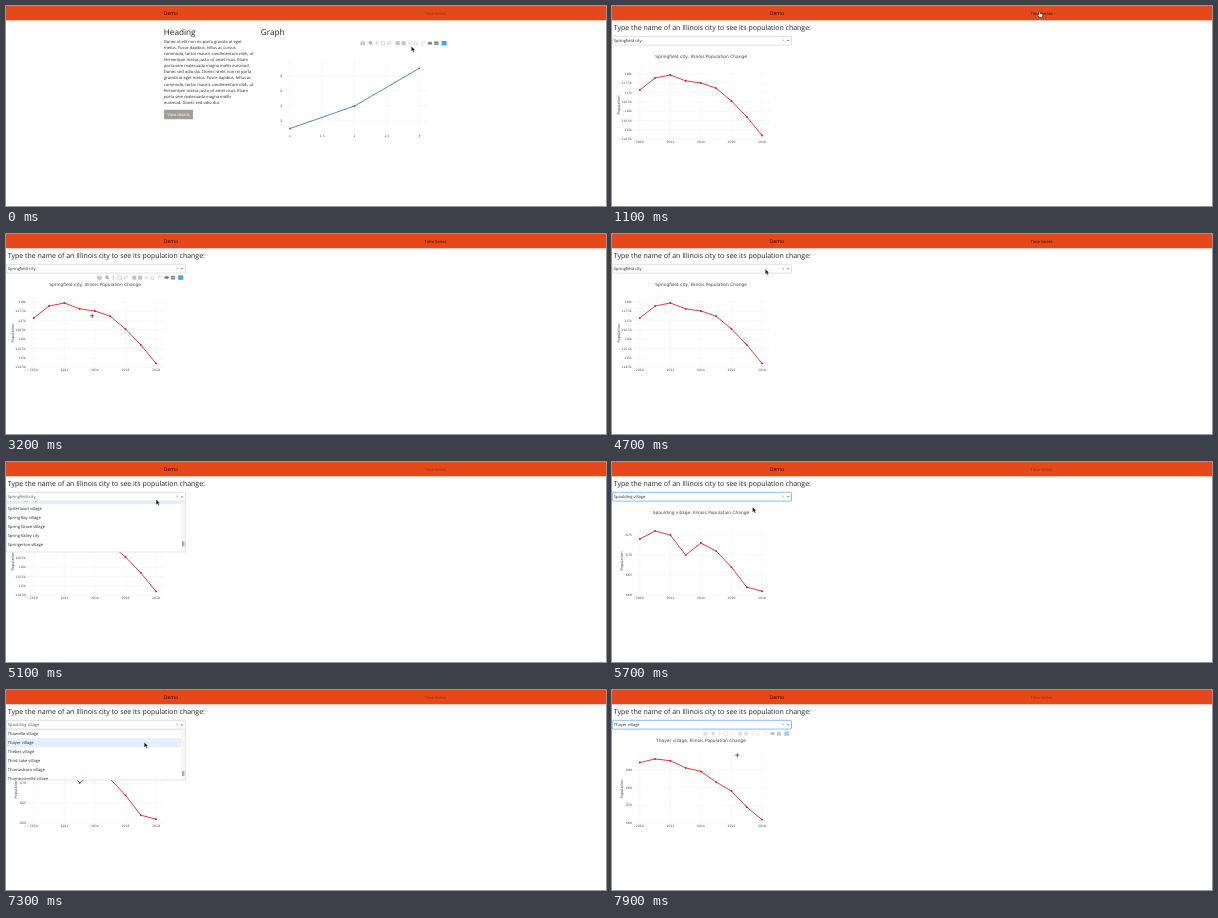
An HTML page for the animation above (8 s loop, 600x200 px).

```html
<!DOCTYPE html>
<html lang="en">
<head>
<meta charset="utf-8">
<title>Demo</title>
<style>
html, body { margin: 0; width: 100%; height: 100%; overflow: hidden; background: #fff; }
svg { display: block; width: 600px; height: 200px; }
text { font-family: "Open Sans", "Noto Sans", sans-serif; font-size: 4.05px; fill: #222; text-rendering: geometricPrecision; }
.plot text, .tip text { font-family: "DejaVu Sans", sans-serif; font-size: 3.1px; fill: #444; }
.plot .title { font-size: 4.36px; }
.plot .axis { font-size: 3.6px; }
.tip text { fill: #fff; }
.grid { stroke: #eee; stroke-width: .45; fill: none; }
</style>
</head>
<body>
<svg id="stage" viewBox="0 0 600 200" xmlns="http://www.w3.org/2000/svg">
  <rect width="600" height="200" fill="#fff"/>
  <rect width="600" height="14.3" fill="#e5491b"/>
  <text x="157.8" y="9.3" style="font-size:5.1px;fill:#111">Demo</text>
  <text id="link" x="418.5" y="9.1">Time-Series</text>
  <g id="home"></g>
  <g id="series">
    <text x="1.8" y="24" style="font-size:6.97px">Type the name of an Illinois city to see its population change:</text>
    <g id="charts"></g>
    <g id="tip" class="tip"></g>
    <g id="bar"></g>
    <rect id="box" x=".3" y="30.3" width="179.2" height="8.8" rx="1" fill="#fff" stroke-width=".6"/>
    <text id="value" x="1.8" y="36.1"></text>
    <path d="M170.2 33.6l1.8 1.8m0-1.8l-1.8 1.8" stroke="#999" stroke-width=".5"/>
    <path id="arrow" fill="#999"/>
    <g id="menu">
      <rect x=".3" y="39.2" width="179.2" height="50.8" fill="#fff" stroke="#ccc" stroke-width=".5"/>
      <clipPath id="clip"><rect x="0" y="39.3" width="176" height="50.4"/></clipPath>
      <g id="rows" clip-path="url(#clip)"></g>
      <rect x="175.2" y="39.4" width="4" height="50.4" fill="#f5f5f5"/>
      <rect id="thumb" x="176" width="2.4" height="5" rx=".5" fill="#aaa"/>
    </g>
  </g>
  <g id="cursor">
    <path id="pointer" d="M0 0v5.3l1.3-1.1 1 2 .9-.4-.9-2h1.6z" fill="#111" stroke="#fff" stroke-width=".35"/>
    <path id="hand" d="M-.9-2.6q.6-.7 1 0v2l2.3.6q.5.2.4 1l-.5 2.3h-3l-1.7-2.2q0-.8.9-.3z" fill="#fff" stroke="#111" stroke-width=".55"/>
    <path id="cross" d="M-2.1 0h4.2M0-2.1v4.2" stroke="#222" stroke-width=".65"/>
  </g>
</svg>
<script>
const $ = id => document.getElementById(id);
const set = (el, o) => { for (const k in o) el.setAttribute(k, o[k]); };
const show = (el, on) => { el.style.display = on ? '' : 'none'; };
const clamp = v => Math.max(0, Math.min(1, v));
const text = (x, y, s, extra = '') => `<text x="${x}" y="${y}" ${extra}>${s}</text>`;
const mid = 'text-anchor="middle"', end = 'text-anchor="end"';

// Line plot shared by both pages
function plot({ pts, color, box, xt, yt, xBase }) {
  const [l, t, r, b] = box;
  let s = '<path class="grid" d="';
  for (const [x] of xt) s += `M${x} ${t}V${b}`;
  for (const [y] of yt) s += `M${l} ${y}H${r}`;
  s += '"/>';
  for (const [x, v] of xt) s += text(x, xBase, v, mid);
  for (const [y, v] of yt) s += text(l - .3, y + 1.1, v, end);
  s += `<polyline points="${pts.join(' ')}" fill="none" stroke="${color}" stroke-width=".85" stroke-linejoin="round"/>`;
  for (const [x, y] of pts) s += `<circle cx="${x}" cy="${y}" r=".95" fill="${color}"/>`;
  return s;
}

// Toolbar above a plot
function toolbar(x, y) {
  const shapes = [
    'M-2-1h1l.5-.7h1l.5.7h1v2.6h-4zM-.7.3a.7.7 0 1 0 1.4 0a.7.7 0 1 0-1.4 0',
    'M-1.8-.4a1.3 1.3 0 1 0 2.6 0a1.3 1.3 0 1 0-2.6 0M.5.6L2 2M-1.1-.4h1.2M-.5-1v1.2',
    'M-2 0h4M0-2v4M-.5-1.5L0-2l.5.5M-.5 1.5L0 2l.5-.5',
    'M-1.8-1.7h3.6v3.4h-3.6z',
    'M-1 1.8q-1.6-1 -.3-2.6q1.4-1.6 2.7-.6q1 1.2-.6 2q-1 .4-2 0',
    'M-1.7-1.7h3.4v3.4h-3.4zM-1 0h2M0-1v2',
    'M-1.7-1.7h3.4v3.4h-3.4zM-1 0h2',
    'M-1.8-1.8L1.8 1.8M1.8-1.8L-1.8 1.8',
    'M-2 .1L0-1.8L2 .1M-1.3 0v1.7h2.6v-1.7',
    'M-1.5 1.8v-3.2h2.8M1.3-1.9v1',
    'M-2 0l.8-1h3.1v2h-3.1z',
    'M-1.9-1.5h3.8v1.2h-3.8zM-1.9.4h3.8v1.2h-3.8z'
  ];
  const at = [0, 8, 14, 20.2, 26.3, 34.8, 40.8, 46.8, 52.8, 61, 67, 73.5];
  const tone = i => i == 1 || i == 10 ? '#777' : i == 11 ? '#888' : '#c2c2c2';
  const solid = i => [0, 5, 6, 10, 11].includes(i);
  return shapes.map((d, i) =>
    `<path transform="translate(${x + at[i]} ${y})" d="${d}" fill="${solid(i) ? tone(i) : 'none'}" stroke="${tone(i)}" stroke-width=".6"/>`
  ).join('') + `<rect x="${x + 78.8}" y="${y - 2.2}" width="5" height="4.4" fill="#3aa5e8"/>`;
}

const lines = ['Donec id elit non mi porta gravida at eget',
  'metus. Fusce dapibus, tellus ac cursus', 'commodo, tortor mauris condimentum nibh, ut',
  'fermentum massa justo sit amet risus. Etiam', 'porta sem malesuada magna mollis euismod.',
  'Donec sed odio dui. Donec id elit non mi porta', 'gravida at eget metus. Fusce dapibus, tellus ac',
  'cursus commodo, tortor mauris condimentum nibh,', 'ut fermentum massa justo sit amet risus. Etiam',
  'porta sem malesuada magna mollis', 'euismod. Donec sed odio dui.'];
// Rows wrap in the narrow column
function wrap(s, max) {
  const out = [''];
  for (const w of s.split(' ')) {
    const cur = out[out.length - 1];
    if ((cur + ' ' + w).trim().length > max) out.push(w);
    else out[out.length - 1] = (cur + ' ' + w).trim();
  }
  return out;
}
const column = wrap(lines.slice(0, 5).join(' ') + ' Donec sed odio dui.', 45);
const para = ['Donec id elit non mi porta gravida at eget', 'metus. Fusce dapibus, tellus ac cursus',
  'commodo, tortor mauris condimentum nibh, ut', 'fermentum massa justo sit amet risus. Etiam',
  'porta sem malesuada magna mollis euismod.', 'Donec sed odio dui. Donec id elit non mi porta',
  'gravida at eget metus. Fusce dapibus, tellus ac', 'commodo, tortor mauris condimentum nibh, ut',
  'fermentum massa justo sit amet risus. Etiam', 'porta sem malesuada magna mollis', 'euismod. Donec sed odio dui.'];

const px = v => 284 + (v - 1) * 64.6, py = v => 130.1 - v * 7.53;
$('home').innerHTML =
  text(157.8, 28.5, 'Heading', 'style="font-size:8.2px"') +
  text(254.8, 28.5, 'Graph', 'style="font-size:8.2px"') +
  para.map((s, i) => text(157.9, 36.8 + i * 6.1, s)).join('') +
  '<rect x="158" y="103.7" width="29" height="9.6" rx=".8" fill="#a59d95"/>' +
  text(172.5, 109.9, 'View details', mid + ' style="fill:#fff"') +
  '<g class="plot">' + plot({
    pts: [[1, 1], [2, 4], [3, 9]].map(([a, b]) => [px(a), py(b)]),
    color: '#2a78b8', box: [276.5, 55, 421, 126.5], xBase: 131,
    xt: [1, 1.5, 2, 2.5, 3].map(v => [px(v), v]),
    yt: [2, 4, 6, 8].map(v => [py(v), v])
  }) + '</g><g id="homeBar">' + toolbar(356.8, 37.2) + '</g>';

const year = i => 27.8 + i * 15.28;
const cities = [
  { name: 'Springfield city', ax: 7.6, ys: [84, 72, 69, 74.8, 77, 82.2, 95, 110.8, 129.4],
    yt: [0, 1, 2, 3, 4, 5, 6, 7].map(i => [133.2 - i * 9.31, 114.5 + i * .5 + 'k']) },
  { name: 'Spaulding village', ax: 10.2, ys: [674, 676, 675, 670, 673, 671, 667, 662, 661].map(v => 133.2 - (v - 660) * 4.01),
    yt: [660, 665, 670, 675].map(v => [133.2 - (v - 660) * 4.01, v]) },
  { name: 'Thayer village', ax: 10.2, ys: [694, 696, 695, 691, 689, 683, 678, 669, 662].map(v => 133.2 - (v - 660) * 1.785),
    yt: [660, 670, 680, 690].map(v => [133.2 - (v - 660) * 1.785, v]) }
];
$('charts').innerHTML = cities.map(c => '<g class="plot">' +
  text(89, 51.8, c.name + ', Illinois Population Change', mid + ' class="title"') +
  `<text class="axis" ${mid} transform="translate(${c.ax - .4} 99) rotate(-90)" y="1">Population</text>` +
  plot({
    pts: c.ys.map((y, i) => [year(i), y]), color: '#e01b1b', box: [20.2, 64.5, 158, 133.2], xBase: 137.2,
    xt: [0, 2, 4, 6, 8].map(i => [year(i), 2010 + i]), yt: c.yt
  }) + '</g>').join('');
$('bar').innerHTML = toolbar(93.4, 43.6);

const V = ' village', C = ' city';
const towns = ('South Pekin,South Roxana,South Wilmington,Sparland,Sparta*,Spaulding,Spillertown,Spring Bay,Spring Grove,' +
  'Spring Valley*,Springerton,Springfield*,Standard,Staunton*,Steeleville,Steger,Sterling*,Steward,Stewardson,Stickney,' +
  'Stockton,Stonefort,Stonington,Strasburg,Streator*,Stronghurst,Sublette,Sugar Grove,Sullivan*,Summerfield,Summit,' +
  'Sumner*,Swansea,Sycamore*,Symerton,Table Grove,Tallula,Tamaroa,Tamms,Tampico,Taylor Springs,Taylorville*,' +
  'Tennessee,Teutopolis,Thawville,Thayer,Thebes,Third Lake,Thomasboro,Thompsonville,Thornton')
  .split(',').map(s => s.endsWith('*') ? s.slice(0, -1) + C : s + V);

// Keys are [time, ...values]; linear between them
function track(keys, t) {
  let i = 0;
  while (i < keys.length - 2 && t >= keys[i + 1][0]) i++;
  const a = keys[i], b = keys[i + 1], u = clamp((t - a[0]) / (b[0] - a[0]));
  return a.slice(1).map((v, k) => v + (b[k + 1] - v) * u);
}
const path = [[0, 405.3, 40.3], [500, 428, 8.2], [1400, 428, 8.2], [1800, 215, 46], [2200, 38, 79], [2700, 58, 73],
  [3100, 79, 78], [3200, 86.3, 81.8], [3600, 104, 84], [4000, 119, 98], [4100, 121, 94], [4700, 153.3, 35],
  [5000, 153.3, 35], [5400, 140.5, 45], [5700, 140.5, 45], [6000, 142, 34], [6200, 142, 34], [6600, 138.2, 52.2],
  [7400, 138.2, 52.2], [7800, 125.3, 65.2], [8000, 125.3, 65.2]];
const scroll = [[0, 54], [5000, 54], [5300, 45], [6199, 45], [6200, 0], [6700, 0], [7200, 396], [8000, 396]];

function tooltip(x, y) {
  const ys = cities[0].ys;
  const i = ys.findIndex((v, k) => Math.hypot(x - year(k), y - v) < 5);
  if (i < 0) return '';
  const k = (114.5 + (133.2 - ys[i]) / 18.62).toFixed(2);
  return `<g transform="translate(${year(i) + 1} ${ys[i]})"><path d="M0 0l1.8-1.6v-2h29.5v7.2h-29.5v-2z" fill="#e01b1b"/>` +
    text(3, 1.1, `(${2010 + i}, ${k}k)`) + '</g>';
}

function draw(t) {
  const [x, y] = track(path, t);
  const onSeries = t >= 1000;
  const city = t < 5700 ? 0 : t < 7400 ? 1 : 2;
  const open = (t >= 4800 && t < 5700) || (t >= 6200 && t < 7400);
  const focus = t >= 4800 && !open;
  $('link').style.fill = t >= 400 && t < 4800 ? '#1c0f08' : '#8c3014';
  show($('home'), !onSeries);
  show($('series'), onSeries);
  set($('homeBar'), { opacity: 1 - clamp((t - 200) / 300) });
  [...$('charts').children].forEach((g, i) => show(g, i == city));
  set($('bar'), { opacity: t < 4400 ? clamp((t - 1800) / 300) : t < 7000 ? 1 - clamp((t - 4400) / 300) : clamp((t - 7700) / 400) });
  $('tip').innerHTML = t >= 2200 && t <= 4100 ? tooltip(x, y) : '';
  set($('box'), { stroke: focus ? '#3c8fe8' : '#ccc' });
  $('value').textContent = cities[city].name;
  $('value').style.fill = open ? '#555' : '#222';
  set($('arrow'), { d: open ? 'M174.4 35.4h3.2l-1.6-1.6z' : 'M174.4 33.9h3.2l-1.6 1.6z' });
  show($('menu'), open);
  if (open) {
    const [top] = track(scroll, t);
    set($('thumb'), { y: 79 + top / 200 });
    let s = '';
    towns.forEach((n, i) => {
      const ry = 39.2 + i * 9 - top;
      if (ry < 30 || ry > 90) return;
      if (y >= ry && y < ry + 9) s += `<rect x=".5" y="${ry}" width="175" height="9" fill="#e3effc"/>`;
      s += text(1.8, ry + 5.9, n, n == cities[city].name ? 'font-weight="700"' : '');
    });
    $('rows').innerHTML = s;
  }
  const hand = y < 13 && x > 418 && x < 441;
  const cross = onSeries && !open && x > 20 && x < 158 && y > 64 && y < 133;
  set($('cursor'), { transform: `translate(${x} ${y})` });
  show($('hand'), hand);
  show($('cross'), cross);
  show($('pointer'), !hand && !cross);
}

const start = performance.now();
let last = -1;
function tick() {
  const t = Math.floor((performance.now() - start) % 8000 / 100) * 100;
  if (t !== last) draw(last = t);
  requestAnimationFrame(tick);
}
tick();
</script>
</body>
</html>
```
